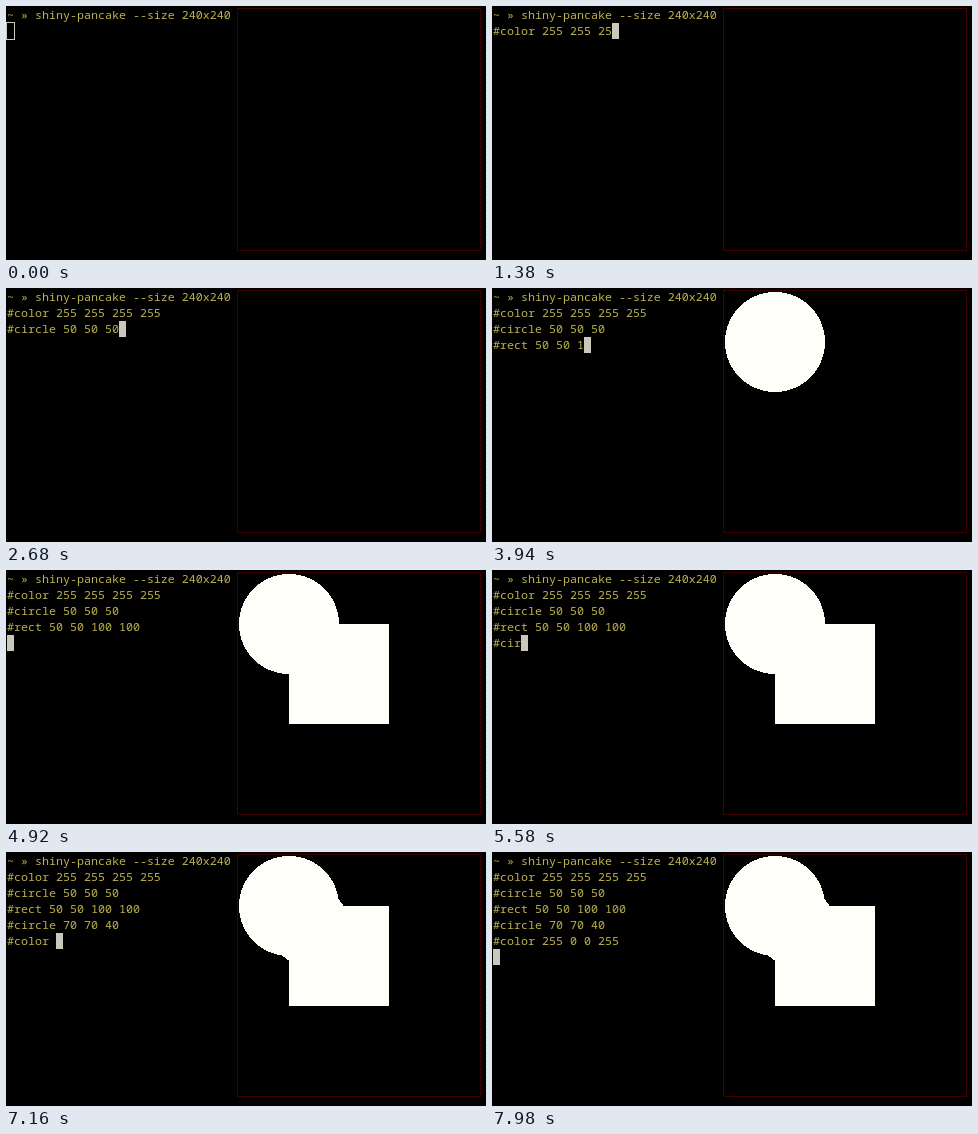
An HTML page for the animation above (8 s loop, 480 px wide and 254 px high).

```html
<!DOCTYPE html>
<html lang="en">
<head>
<meta charset="utf-8">
<title>Drawing from the terminal</title>
<style>
  html, body { margin: 0; width: 100%; height: 100%; overflow: hidden; background: #000; }
  svg { display: block; width: 100%; height: 100%; }
  text {
    font: 11.667px "Noto Sans Mono", "DejaVu Sans Mono", monospace;
    fill: #bdb24e;
    white-space: pre;
  }
  .shape { fill: #fffffa; visibility: hidden; }
  .frame { fill: none; stroke: #520000; stroke-dasharray: 3 1; }
</style>
</head>
<body>
<svg viewBox="0 0 480 254">
  <rect width="480" height="254"/>
  <rect class="frame" x="231.5" y="2.5" width="243" height="242"/>
  <g transform="translate(233 4)" shape-rendering="crispEdges">
    <circle class="shape" data-line="1" cx="50" cy="50" r="50"/>
    <rect class="shape" data-line="2" x="50" y="50" width="100" height="100"/>
    <circle class="shape" data-line="3" cx="70" cy="70" r="40"/>
  </g>
  <rect id="cursor"/>
  <g id="terminal"><text x="1" y="13">~ » shiny-pancake --size 240x240</text></g>
</svg>
<script>
  const LOOP = 8000, FOCUS = 160, CHAR = 7, ROW = 16;
  // Times in ms: first key, gap between keys, Enter.
  const lines = [
    { text: '#color 255 255 255 255', start: 340, gap: 62, enter: 1720 },
    { text: '#circle 50 50 50', start: 1790, gap: 56, enter: 2860 },
    { text: '#rect 50 50 100 100', start: 3060, gap: 70, enter: 4500 },
    { text: '#circle 70 70 40', start: 5300, gap: 72, enter: 6560 },
    { text: '#color 255 0 0 255', start: 6760, gap: 60, enter: 7920 }
  ];
  const terminal = document.getElementById('terminal');
  const cursor = document.getElementById('cursor');
  const shapes = document.querySelectorAll('.shape');

  const setAttributes = (el, attrs) => {
    for (const name in attrs) el.setAttribute(name, attrs[name]);
  };

  lines.forEach((line, i) => {
    line.el = document.createElementNS('http://www.w3.org/2000/svg', 'text');
    setAttributes(line.el, { x: 1, y: 13 + ROW * (i + 1) });
    terminal.append(line.el);
  });

  const typedCount = (line, t) =>
    Math.min(line.text.length, Math.max(0, Math.floor((t - line.start) / line.gap) + 1));

  function placeCursor(column, row, focused) {
    const inset = focused ? 0 : -0.5;
    setAttributes(cursor, {
      x: 1 + column * CHAR + inset,
      y: 1 + row * ROW + inset,
      width: focused ? 7 : 8,
      height: focused ? 16 : 17,
      fill: focused ? '#c8c8bc' : 'none',
      stroke: focused ? 'none' : '#c8c8bc'
    });
  }

  function draw(now) {
    const t = now % LOOP;
    for (const line of lines) line.el.textContent = line.text.slice(0, typedCount(line, t));
    const entered = lines.filter(line => t >= line.enter).length;
    const column = entered < lines.length ? typedCount(lines[entered], t) : 0;
    placeCursor(column, entered + 1, t >= FOCUS);
    for (const shape of shapes) {
      shape.style.visibility = entered > shape.dataset.line ? 'visible' : 'hidden';
    }
  }

  const origin = performance.now();
  function tick() {
    draw(performance.now() - origin);
    requestAnimationFrame(tick);
  }
  tick();
</script>
</body>
</html>
```
